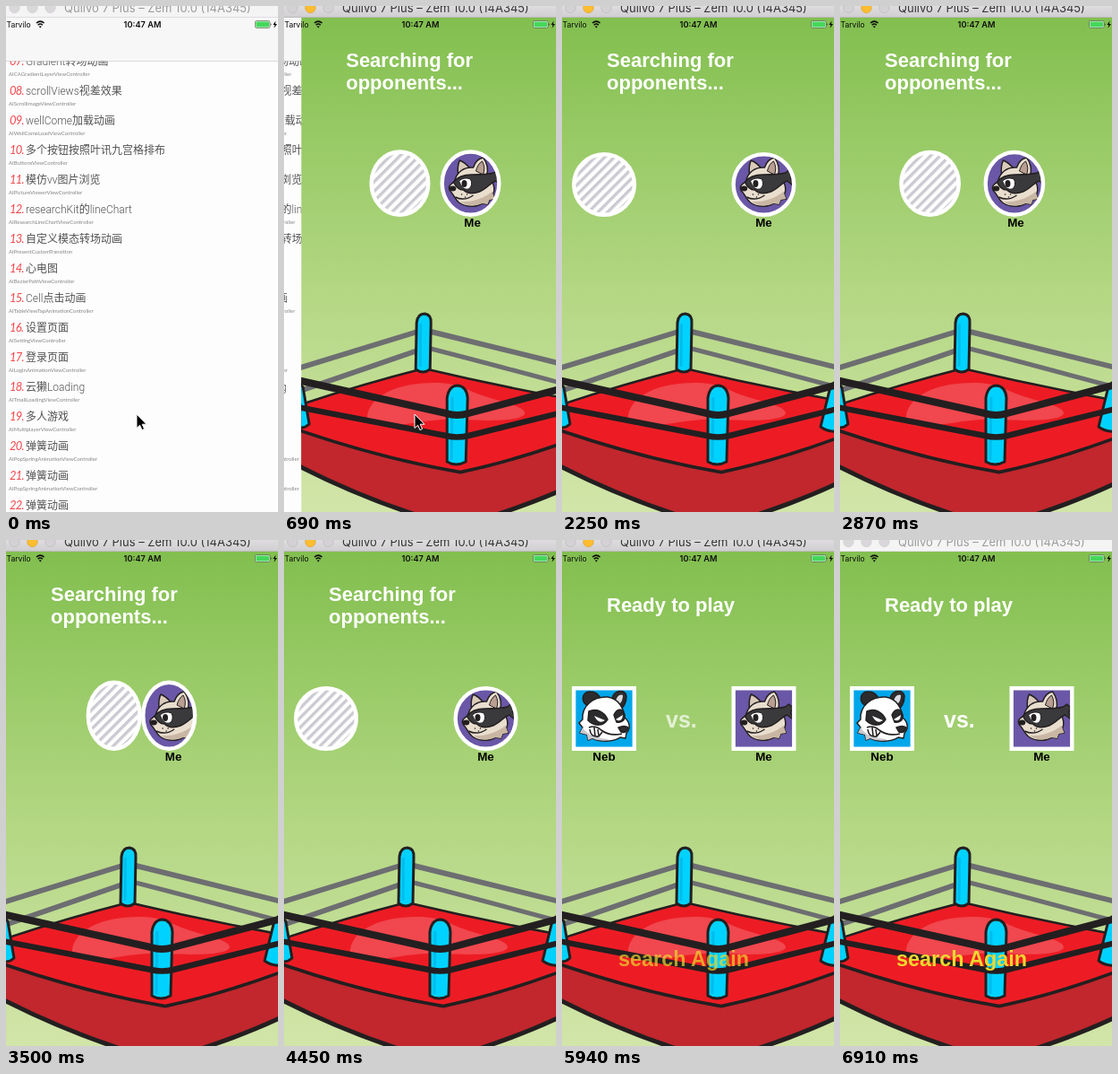
An HTML page for the animation above (7.01 s loop, 304 by 564 pixels).

```html
<!DOCTYPE html>
<html lang="en">
<head>
<meta charset="utf-8">
<title>Ring match</title>
<style>
html, body { margin: 0; width: 100%; height: 100%; overflow: hidden; background: #fcfcfc; }
svg { display: block; width: 100%; height: 100%; }
.round { font-family: "Liberation Sans", Arial, sans-serif; font-weight: 700; }
.ui { font-family: Inter, sans-serif; }
.num { font: italic 13px Lato, sans-serif; letter-spacing: -.8px; fill: #f4474b; }
.row { font: 300 12px Roboto, "Noto Sans CJK SC", "Noto Sans CJK", sans-serif; fill: #525254; }
.sub { font: 6px Lato, sans-serif; fill: #858587; }
</style>
</head>
<body>
<svg viewBox="0 0 304 564" xmlns="http://www.w3.org/2000/svg">
<defs>
  <linearGradient id="sky" x1="0" y1="0" x2="0" y2="1">
    <stop offset="0" stop-color="#82bf4f"/><stop offset=".25" stop-color="#98ca66"/>
    <stop offset=".55" stop-color="#b3d783"/><stop offset="1" stop-color="#d2e5a9"/>
  </linearGradient>
  <linearGradient id="bar" x1="0" y1="0" x2="0" y2="1">
    <stop offset="0" stop-color="#dedcde"/><stop offset="1" stop-color="#d0ced0"/>
  </linearGradient>
  <pattern id="stripes" width="7.6" height="7.6" patternUnits="userSpaceOnUse" patternTransform="rotate(45)">
    <rect width="7.6" height="7.6" fill="#fff"/><rect width="3.4" height="7.6" fill="#cccad1"/>
  </pattern>
  <clipPath id="screen"><rect y="13" width="304" height="551"/></clipPath>
  <clipPath id="clipL"><path/></clipPath>
  <clipPath id="clipR"><path/></clipPath>
</defs>

<g id="list">
  <rect y="13" width="304" height="551" fill="#fdfdfd"/>
  <g id="rows"></g>
  <rect y="13" width="304" height="48" fill="#f8f7f7"/>
  <rect y="61" width="304" height=".6" fill="#c4c4c7"/>
</g>

<g id="game" clip-path="url(#screen)">
  <rect y="13" width="304" height="551" fill="url(#sky)"/>
  <g stroke="#231f20" stroke-linejoin="round">
    <path d="M-6 471 Q90 504 178 519 Q240 506 310 480 V531 Q268 551 212 569 H134 Q62 546 -6 511Z" fill="#c1272d" stroke-width="5"/>
    <path d="M137 404 Q222 424 310 440 V480 Q240 506 178 519 Q90 504 -6 471 V446 Q66 422 137 404Z" fill="#ed1c24" stroke-width="2.5"/>
    <path d="M74 456 C78 434 108 420 148 420 C176 420 184 428 202 434 C226 442 250 446 250 454 C248 462 216 463 176 461 C140 459 112 470 88 468 C78 467 73 462 74 456Z" fill="#f1474e" stroke="none"/>
    <g fill="none" stroke="#6d6e71" stroke-width="6">
      <path d="M-4 404 L130 363 M-4 430 L130 384 M145 363 L308 403"/>
      <path d="M145 382 Q200 396 308 425" stroke-width="5"/>
    </g>
    <g fill="#00d2ff" stroke-width="3">
      <path d="M128 405 L129 353 Q130 343 138 343 Q146 344 145 354 L144 405 Q136 411 128 405Z"/>
      <path d="M-4 418 L2 425 L9 466 Q4 471 -4 470Z"/>
      <path d="M308 416 L300 424 L289 469 Q297 475 308 474Z"/>
    </g>
    <path d="M163 508 L163 437 Q165 423 175 423 Q185 424 186 437 L184 508 Q173 514 163 508Z" fill="#00d2ff" stroke-width="3"/>
    <path d="M133.5 354 L133 402 M169 436 L168 506" stroke="#00bdec" stroke-width="3" fill="none"/>
    <path d="M-4 417 L162 454 Q174 458 187 454 L308 422" fill="none" stroke-width="8"/>
    <path d="M-4 447 L162 479 Q174 482 187 479 L308 449" fill="none" stroke-width="6.5"/>
  </g>

  <g class="round" fill="#fff" font-size="22">
    <text id="line1" x="50"></text>
    <text id="line2" x="50" y="92.8"></text>
    <text id="vs" x="116" y="209" font-size="25">vs.</text>
    <text id="again" x="63" y="474.5" font-size="23.4" fill="#eed72f">search Again</text>
  </g>

  <g id="left">
    <g clip-path="url(#clipL)">
      <rect id="blank" x="-40" y="-50" width="80" height="90" fill="url(#stripes)"/>
      <g id="panda" stroke="#231f20" stroke-width="1.5" stroke-linejoin="round">
        <rect x="-40" y="-50" width="80" height="90" fill="#00a6ea" stroke="none"/>
        <path d="M-17 -14 C-27 -17 -25 -30 -16 -30 C-9 -30 -5 -26 -4 -21Z" fill="#2c2b2d"/>
        <path d="M9 -21 C9 -32 24 -34 25 -25 C25 -17 21 -11 17 -11Z" fill="#2c2b2d"/>
        <path d="M13 -20 Q16 -28 21 -26 Q21 -19 17 -16Z" fill="#dcdce0" stroke="none"/>
        <path d="M-28 5 L-24 1 C-25 -14 -12 -25 4 -24 C17 -22 22 -11 23 -1 C29 4 30 11 25 16 L24 22 L18 21 C9 27 -5 26 -13 22 L-18 24 L-19 18 L-27 16 L-24 10Z" fill="#fff"/>
        <path d="M-24 10 C-17 20 -8 22 6 23 C-2 26 -9 24 -13 22 L-18 24 L-19 18 L-27 16Z" fill="#c9c9cf" stroke="none"/>
        <path d="M-17 -8 C-9 -12 0 -8 4 1 C-1 9 -11 9 -18 2Z M11 -4 C15 -12 21 -12 23 -4 C24 2 19 5 14 4Z" fill="#2c2b2d"/>
        <path d="M-11 -3 L1 2 Q-6 7 -11 -3Z M13 1 L21 -4 Q20 5 13 1Z" fill="#fff" stroke="none"/>
        <path d="M16 10 Q23 7 27 10 Q25 17 19 15Z" fill="#2c2b2d"/>
        <path d="M-17 10 Q-10 7 -3 13 Q6 20 20 17 M-16 12 Q-15 21 -6 20 L-2 15 M-11 10 L-10 19 M-7 12 L-6 19" fill="none" stroke-width="1.6"/>
      </g>
    </g>
    <path class="frame"/>
    <text id="foe" class="round" y="46.6" font-size="13.4" text-anchor="middle">Neb</text>
  </g>
  <g id="right">
    <g clip-path="url(#clipR)">
      <rect x="-40" y="-50" width="80" height="90" fill="#6a57a7"/>
      <g stroke="#231f20" stroke-width="1.5" stroke-linejoin="round">
        <path d="M-16 -11 Q-17 -22 -14 -27 Q-7 -24 -3 -18Z" fill="#d9cab9"/>
        <path d="M-25 7 C-28 2 -24 -1 -20 -3 C-18 -14 -9 -20 1 -19 C3 -25 7 -29 12 -30 C17 -24 18 -16 16 -10 C24 -4 26 5 23 11 L25 16 L19 17 L17 22 L11 21 C3 26 -8 25 -15 20 C-20 16 -20 12 -25 7Z" fill="#e9dece"/>
        <path d="M4 -15 Q6 -23 11 -26 Q15 -19 12 -11Z" fill="#b99f92" stroke-width="1"/>
        <path d="M-13 19 C-2 20 12 16 22 8 L25 16 L19 17 L17 22 L11 21 C3 25 -7 24 -13 19Z" fill="#c9b7a4" stroke="none"/>
        <path d="M-21 -3 C-16 -9 -9 -11 -1 -11 C9 -11 17 -11 24 -13 L28 -16 L33 -12 L30 -7 L34 2 L26 -4 C20 -2 16 5 8 8 C0 11 -6 10 -10 6 C-15 6 -19 2 -21 -3Z" fill="#3a393c"/>
        <path d="M-15 -4 Q-9 -9 -2 -6 Q1 1 -4 5 Q-11 7 -15 -4Z" fill="#fff" stroke-width="1"/>
        <ellipse cx="-9" cy="-1" rx="3" ry="4" fill="#231f20" stroke="none"/>
        <ellipse cx="-22" cy="4.5" rx="3.8" ry="3" fill="#231f20" stroke="none"/>
        <path d="M-19 14 Q-9 19 1 12" fill="none"/>
        <path d="M-12 11h.1M-8 14h.1M-6 11h.1" stroke-linecap="round" fill="none"/>
      </g>
    </g>
    <path class="frame"/>
    <text class="round" y="46.6" font-size="13.4" text-anchor="middle">Me</text>
  </g>
</g>

<g id="status" class="ui" fill="#0c0c0c">
  <text x="0.5" y="23.8" font-size="8.6">Tarvilo</text>
  <path d="M34 19 Q38.3 15.2 42.6 19 M35.7 21.2 Q38.3 18.8 40.9 21.2" fill="none" stroke="#0c0c0c" stroke-width="1.5"/>
  <path d="M36.8 22.8 Q38.3 21.6 39.8 22.8 L38.3 24.6Z"/>
  <text x="152.5" y="24" font-size="9.2" font-weight="600" text-anchor="middle">10:47 AM</text>
  <rect x="278.5" y="16.5" width="16.5" height="8" rx="1.6" fill="#e9f6e6" stroke="#3c4c38" stroke-width=".6"/>
  <rect x="279.5" y="17.5" width="14.5" height="6" rx=".8" fill="#45d75c"/>
  <path d="M295.8 19 q1.6 1.5 0 3Z"/>
  <path d="M301.6 16.4 L298.4 21 H300.4 L299.5 24.8 L303 19.9 H300.9Z"/>
</g>

<g id="title" class="ui">
  <rect id="bar-bg" width="304" height="13"/>
  <rect id="bar-line" y="12.3" width="304" height=".7"/>
  <g id="lights" stroke-width=".7">
    <circle cx="9.5" cy="2" r="5.7"/><circle cx="29.5" cy="2" r="5.7"/><circle cx="49.5" cy="2" r="5.7"/>
  </g>
  <text id="name" x="65" y="7.2" font-size="13">Quilvo 7 Plus – Zem 10.0 (14A345)</text>
</g>

<path id="cursor" d="M0 0 V15.5 L3.6 12.2 L6 17.6 L8.6 16.4 L6.2 11.2 H11Z" fill="#000" stroke="#fff" stroke-width="1"/>
</svg>

<script>
const LOOP = 7010, SEC = 1000;
const PUSH = 330, PUSH_LEN = 600;
const BOUNCES = [430, 2660];
const FOUND = 4480, SQUARE = 4750, READY = 5800, FADE = 200;
const R = 33.8, STROKE = 4.4, AVATAR_Y = 199;
const AVATARS = {
  left: { home: 47, meet: 116, side: 1, clip: "clipL" },
  right: { home: 225.5, meet: 187, side: -1, clip: "clipR" }
};
const ROWS = [
  ["Gradient转场动画", "AICAGradientLayerViewController"],
  ["scrollViews视差效果", "AIScrollImageViewController"],
  ["wellCome加载动画", "AIWellComeLoadViewController"],
  ["多个按钮按照叶讯九宫格排布", "AIButtonsViewController"],
  ["模仿vv图片浏览", "AIPictureViewerViewController"],
  ["researchKit的lineChart", "AIResearchLineChartViewController"],
  ["自定义模态转场动画", "AIPresentCustomTransition"],
  ["心电图", "AIBezierPathViewController"],
  ["Cell点击动画", "AITableViewTapAnimationController"],
  ["设置页面", "AISettingViewController"],
  ["登录页面", "AILoginAnimationViewController"],
  ["云獭Loading", "AITmallLoadingViewController"],
  ["多人游戏", "AIMultiplayerViewController"],
  ["弹簧动画", "AIPopSpringAnimationViewController"],
  ["弹簧动画", "AIPopSpringAnimationViewController"],
  ["弹簧动画", "AIPopSpringAnimationViewController"]
];

const $ = id => document.getElementById(id);
const clamp = v => Math.max(0, Math.min(1, v));
const lerp = (a, b, k) => a + (b - a) * k;
const show = (id, on) => $(id).setAttribute("display", on ? "inline" : "none");
const move = (id, x, y) => $(id).setAttribute("transform", `translate(${x.toFixed(2)} ${y.toFixed(2)})`);

$("rows").innerHTML = ROWS.map(([name, sub], i) => {
  const y = 65.5 + 33 * i;
  return `<text class="num" x="4" y="${y}">${String(i + 7).padStart(2, "0")}.</text>` +
    `<text class="row" x="22" y="${y}">${name}</text>` +
    `<text class="sub" x="3" y="${y + 12.5}">${sub}</text>`;
}).join("");

for (const frame of document.querySelectorAll(".frame")) {
  frame.setAttribute("fill", "none");
  frame.setAttribute("stroke", "#fff");
  frame.setAttribute("stroke-width", STROKE);
}

// Cubic ease-out (0, 0, .58, 1)
function easeOut(p) {
  p = clamp(p);
  let lo = 0, hi = 1;
  for (let i = 0; i < 24; i++) {
    const s = (lo + hi) / 2;
    if (3 * (1 - s) * s * s * .58 + s * s * s < p) lo = s; else hi = s;
  }
  return 3 * (1 - lo) * lo * lo + lo * lo * lo;
}

// Distance left to travel on a spring with damping .7, settling in 1 s
function spring(ms) {
  const s = ms / SEC;
  if (s <= 0) return 1;
  if (s >= 1) return 0;
  return Math.exp(-6.9 * s) * (Math.cos(7.05 * s) + .98 * Math.sin(7.05 * s));
}

function bounce(t) {
  const start = BOUNCES.filter(b => t >= b).pop();
  if (start === undefined) return { travel: 0, squash: 0 };
  const dt = t - start;
  return dt < SEC
    ? { travel: 1 - spring(dt), squash: easeOut(dt / SEC) }
    : { travel: spring(dt - SEC), squash: 0 };
}

function ellipse(cx, cy, rx, ry) {
  const c = .5523;
  return [[1, 0], [1, c], [c, 1], [0, 1], [-c, 1], [-1, c], [-1, 0],
    [-1, -c], [-c, -1], [0, -1], [c, -1], [1, -c], [1, 0]]
    .map(([x, y]) => [cx + x * rx, cy + y * ry]);
}

function square(r) {
  const corners = [[-r, -r], [r, -r], [r, r], [-r, r], [-r, -r]];
  const pts = [corners[0]];
  for (let i = 0; i < 4; i++)
    for (let j = 1; j <= 3; j++)
      pts.push([0, 1].map(a => lerp(corners[i][a], corners[i + 1][a], j / 3)));
  return pts;
}

// The outline blends point by point, so the square turns as it forms
function outline(side, squash, morph) {
  const rx = R * (1 - .15 * squash), ry = R * (1 + .1 * squash);
  const to = square(R);
  const pts = ellipse(side * (R - rx), R - ry, rx, ry)
    .map((p, i) => p.map((v, a) => lerp(v, to[i][a], morph).toFixed(2)).join(" "));
  return `M${pts[0]} C${pts.slice(1).join(" ")}Z`;
}

function drawAvatars(t) {
  const { travel, squash } = bounce(t);
  const morph = easeOut((t - SQUARE) / SEC);
  for (const id in AVATARS) {
    const a = AVATARS[id];
    const d = outline(a.side, squash, morph);
    move(id, lerp(a.home, a.meet, travel), AVATAR_Y);
    $(id).querySelector(".frame").setAttribute("d", d);
    $(a.clip).firstElementChild.setAttribute("d", d);
  }
  show("panda", t >= FOUND);
  show("blank", t < FOUND);
  show("foe", t >= FOUND);
}

function drawText(t) {
  const searching = t < FOUND;
  $("line1").textContent = searching ? "Searching for" : t < READY ? "Connecting..." : "Ready to play";
  $("line1").setAttribute("y", searching ? 67.8 : 80.4);
  $("line2").textContent = searching ? "opponents..." : "";
  const alpha = clamp((t - READY) / FADE);
  $("vs").setAttribute("opacity", alpha);
  $("again").setAttribute("opacity", alpha);
}

function drawTitle(active) {
  $("bar-bg").setAttribute("fill", active ? "url(#bar)" : "#f5f4f5");
  $("bar-line").setAttribute("fill", active ? "#b3b0b3" : "#d6d4d6");
  $("name").setAttribute("fill", active ? "#343434" : "#9c9a9c");
  [...$("lights").children].forEach((c, i) => {
    const lit = active && i === 1;
    c.setAttribute("fill", lit ? "#fdbd2f" : active ? "#d3d1d3" : "#d9d7d9");
    c.setAttribute("stroke", lit ? "#e0a02a" : active ? "#bdbabd" : "#cfcdcf");
  });
}

function render(t) {
  const p = 1 - Math.pow(1 - clamp((t - PUSH) / PUSH_LEN), 3);
  move("list", -91 * p, 0);
  move("game", 304 * (1 - p), 0);
  show("list", p < 1);
  show("game", p > 0);
  drawAvatars(t);
  drawText(t);
  drawTitle(t >= 150 && t < 6910);

  const c = clamp((t - 1850) / 200);
  move("cursor", lerp(146, 278, c * c), lerp(455, 430, c * c));
  show("cursor", c < 1);
}

const begin = performance.now();
function tick() {
  render((performance.now() - begin) % LOOP);
  requestAnimationFrame(tick);
}
render(0);
requestAnimationFrame(tick);
</script>
</body>
</html>
```
